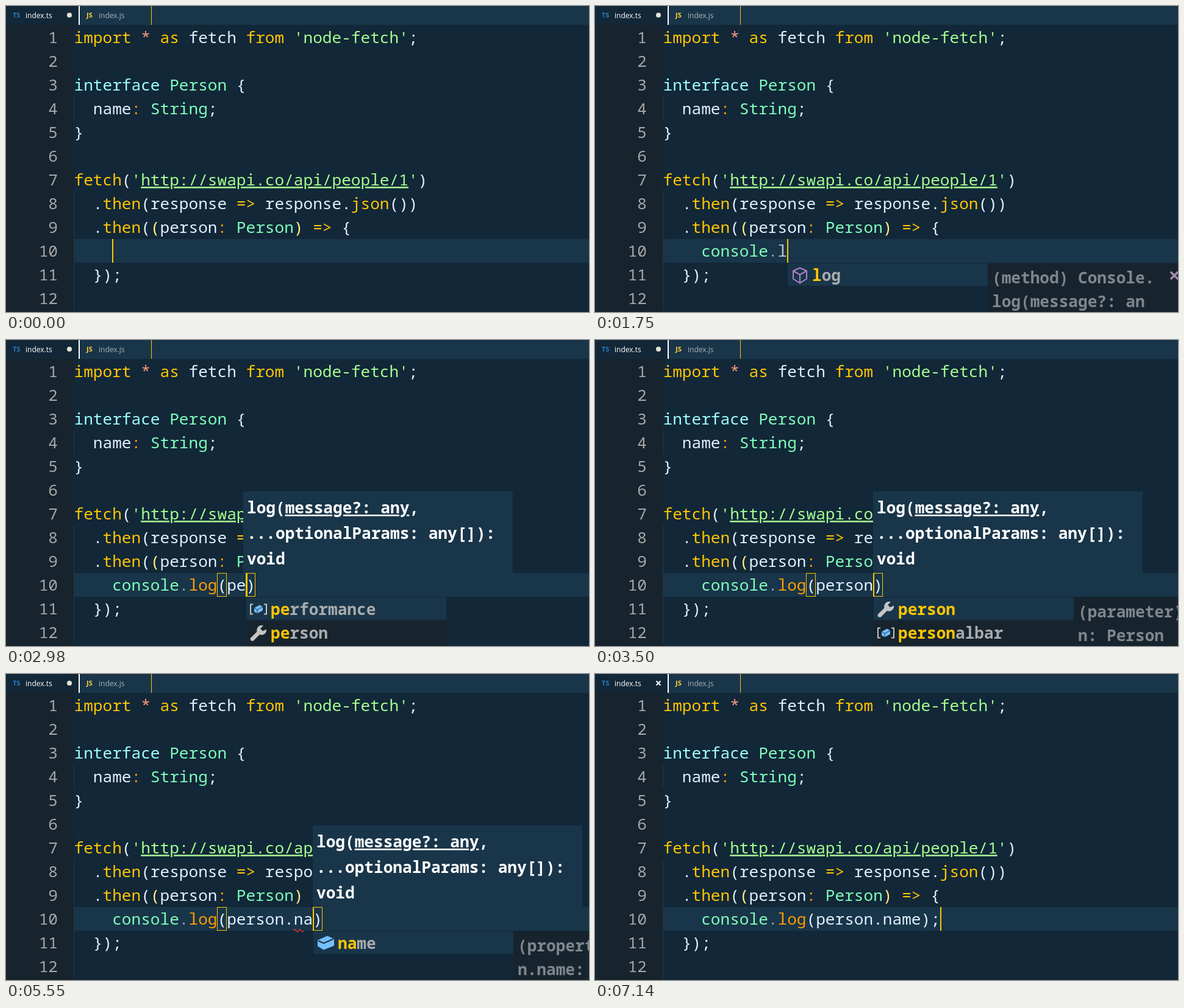
Animation of 956 by 503 pixels, one loop 7.96 s. Source, as an HTML page:

```html
<!DOCTYPE html>
<html lang="en">
<head>
<meta charset="utf-8">
<title>Typing in an editor</title>
<style>
  html, body { margin: 0; width: 100%; height: 100%; overflow: hidden; background: #122738; }
  svg { display: block; width: 100vw; height: 100vh; }
  text { white-space: pre; font: 26.12px "Noto Sans Mono", monospace; font-variant-ligatures: none; }
  .bold { font-weight: 700; }
  .details { font-weight: 600; fill: #80868b; }
  .tab { font: 12px "Open Sans", sans-serif; }
  .kind { font: 700 11px "Open Sans", sans-serif; }
  .link { text-decoration: underline 2px; text-decoration-skip-ink: none; }
</style>
</head>
<body>
<svg viewBox="0 0 956 503">
  <g id="page"></g>
  <g id="live"></g>
</svg>
<script>
const LOOP = 7960, LEFT = 111.5, PITCH = 15.67, LINE = 39;
const COLORS = {
  w: '#e1efff', y: '#ffc600', c: '#9effff', g: '#80ffbb', s: '#a5ff90', u: '#a5ff90',
  o: '#ff9d00', r: '#ff9d80', p: '#ffee80', d: '#8aa0ae', l: '#bcc8d0', m: '#a9abad', k: '#ffffff', K: '#ffffff'
};

const colX = col => LEFT + col * PITCH;
const baseline = line => 61 + (line - 1) * LINE;
const rect = (x, y, w, h, fill, extra = '') =>
  `<rect x="${x}" y="${y}" width="${w}" height="${h}" fill="${fill}" ${extra}/>`;
const path = (d, fill, stroke = 'none', width = 2) =>
  `<path d="${d}" fill="${fill}" stroke="${stroke}" stroke-width="${width}" stroke-linejoin="round"/>`;
const label = (x, y, text, extra) => `<text x="${x}" y="${y}" ${extra}>${text}</text>`;
// Runs are [colour key, text]; keys u and K are underlined.
const runs = (x, y, parts, cls = '') => label(x, y, parts.map(([key, text]) =>
  `<tspan fill="${COLORS[key]}"${/[uK]/.test(key) ? ' class="link"' : ''}>${text}</tspan>`).join(''), `class="${cls}"`);

const CODE = {
  1: [['y', 'import '], ['r', '*'], ['y', ' as '], ['w', 'fetch '], ['y', 'from '], ['s', "'node-fetch'"], ['w', ';']],
  3: [['c', 'interface '], ['g', 'Person '], ['w', '{']],
  4: [['w', '  name'], ['o', ': '], ['g', 'String'], ['w', ';']],
  5: [['w', '}']],
  7: [['y', 'fetch'], ['w', '('], ['s', "'"], ['u', 'http://swapi.co/api/people/1'], ['s', "'"], ['w', ')']],
  8: [['w', '  .'], ['y', 'then'], ['w', '(response '], ['y', '=> '], ['w', 'response.'], ['y', 'json'], ['w', '())']],
  9: [['w', '  .'], ['y', 'then'], ['w', '('], ['p', '('], ['w', 'person'], ['o', ': '], ['g', 'Person'],
      ['p', ') '], ['y', '=> '], ['w', '{']],
  11: [['w', '  });']]
};

const ICONS = {
  method: path('M0-12 11-7V6L0 13-11 6V-7ZM-11-7 0-1 11-7M0-1V13', 'none', '#b180c8', 2),
  variable: path('M-9-8H-13V8H-9M9-8H13V8H9', 'none', '#c5c5c5', 2) +
    path('M-7-2 2-7 7-4V2L-2 7-7 4Z', '#75beff') + path('M-7-2-2 1 7-4M-2 1V7', 'none', '#193549', 1),
  parameter: path('M-10 10 3-3', 'none', '#c5c5c5', 6.5) +
    path('M8-12A8 8 0 1 0 13-6L7-3 3-7Z', '#c5c5c5') + '<circle cx="-10" cy="10" r="3.3" fill="#c5c5c5"/>',
  field: path('M-13-5 3-12 14-7V4L-3 11-13 5Z', '#75beff') + path('M-12-4-3 0 13-7', 'none', '#193549', 2)
};

const LISTS = {
  global: { items: [['variable', 'console'], ['method', 'confirm']] },
  console: { items: [['variable', 'console']] },
  members: { items: [['method', 'assert'], ['method', 'clear']], details: ['(method) Console.', 'assert(test?: boo'] },
  log: { items: [['method', 'log']], details: ['(method) Console.', 'log(message?: an'] },
  early: { items: [['variable', 'performance'], ['parameter', 'person']] },
  perf: { items: [['variable', 'performance'], ['parameter', 'person']], details: ['var performance: ', 'Performance'] },
  person: { items: [['parameter', 'person'], ['variable', 'personalbar']], details: ['(parameter) perso', 'n: Person'] },
  name: { items: [['field', 'name']], details: ['(property) Perso', 'n.name: String'] }
};

// Time, text before the caret, suggestion list, options
const STEPS = [
  [0, ''],
  [250, '', null, { noCaret: true }],
  [810, 'c'],
  [870, 'c', 'global'],
  [930, 'co', 'global'],
  [1030, 'con', 'global'],
  [1120, 'cons', 'console'],
  [1210, 'conso', 'console'],
  [1300, 'consol', 'console'],
  [1380, 'console', 'console'],
  [1490, 'console.'],
  [1550, 'console.', 'members'],
  [1750, 'console.l', 'log'],
  [1980, 'console.lo', 'log'],
  [2110, 'console.log', 'log'],
  [2340, 'console.log('],
  [2440, 'console.log(', null, { sig: true }],
  [2850, 'console.log(p', null, { sig: true }],
  [2890, 'console.log(p', 'early', { sig: true }],
  [2980, 'console.log(pe', 'early', { sig: true, lag: 4 }],
  [3030, 'console.log(per', 'early', { sig: true }],
  [3080, 'console.log(per', 'perf', { sig: true }],
  [3280, 'console.log(pers', 'person', { sig: true }],
  [3380, 'console.log(perso', 'person', { sig: true }],
  [3460, 'console.log(person', 'person', { sig: true }],
  [3650, 'console.log(person.', null, { sig: true }],
  [3700, 'console.log(person.', 'name', { sig: true }],
  [3980, 'console.log(person.n', 'name', { sig: true }],
  [4310, 'console.log(person.n', 'name', { sig: true, wave: 1 }],
  [5550, 'console.log(person.na', 'name', { sig: true, wave: 1 }],
  [5880, 'console.log(person.nam', 'name', { sig: true, wave: 2 }],
  [5970, 'console.log(person.name', 'name', { sig: true, wave: 2 }],
  [6310, 'console.log(person.name)'],
  [6570, 'console.log(person.name);'],
  [7090, 'console.log(person.name);', null, { saved: true }]
];

function drawPage() {
  let out = rect(0, 0, 956, 503, '#122738') + rect(0, 31, 111, 472, '#17242e') +
    rect(119, 0, 837, 31, '#193549') + rect(119, 0, 2, 31, '#fff') + rect(238, 0, 1, 31, '#ffc600') +
    label(11, 19, 'TS', 'class="kind" fill="#2b7cc0"') + label(32, 20, 'index.ts', 'class="tab" fill="#fff"') +
    label(132, 19, 'JS', 'class="kind" fill="#ffd23a"') + label(152, 20, 'index.js', 'class="tab" fill="#a9b3ba"') +
    rect(111, 383, 845, LINE, '#193549');
  for (let n = 1; n <= 12; n++) {
    out += label(85, baseline(n), n, 'text-anchor="end" fill="#a5a7a8"');
    if (n === 4 || n > 7) out += rect(111, 32 + (n - 1) * LINE, 1, LINE, '#20394a');
    if (CODE[n]) out += runs(LEFT, baseline(n), CODE[n]);
  }
  return out;
}

function drawTyped(text) {
  const [, object, dot, method, rest] = text.match(/^(\w*)(\.?)(\w*)(.*)$/);
  const closing = rest && !rest.includes(')') ? ')' : '';
  return runs(colX(4), baseline(10), [
    [object === 'console' ? 'g' : 'w', object], ['d', dot], [rest ? 'o' : 'l', method], ['w', rest + closing]
  ]);
}

function drawBrackets(col) {
  return [15, col].map(c => rect(Math.floor(colX(c)) + .5, 383.5, 15, 38, 'none', 'stroke="#ffc600"')).join('');
}

function drawWave(count) {
  return ['#e5343d', '#d9a52b'].slice(0, count).map((color, i) =>
    path(`M${colX(23 + i)} 422` + 'q2-4 4 0t4 0'.repeat(2), 'none', color, 1.5)).join('');
}

function drawSignature(x) {
  return rect(x, 249, 442, 134, '#193549') +
    runs(x + 6, 285, [['k', 'log('], ['K', 'message?: any'], ['k', ',']], 'bold') +
    runs(x + 6, 327, [['k', '...optionalParams: any[]):']], 'bold') +
    runs(x + 6, 369, [['k', 'void']], 'bold');
}

function drawList(x, { items, details }, typed) {
  const word = typed.match(/\w*$/)[0];
  let out = '';
  items.forEach(([kind, name], i) => {
    const y = 423 + i * LINE;
    out += rect(x, y, 328, i ? 41 : 37, i ? '#17242e' : '#193549') +
      `<g transform="translate(${x + 20} ${y + 19.5})">${ICONS[kind]}</g>` +
      runs(x + 40, y + 29, [['y', name.slice(0, word.length)], ['m', name.slice(word.length)]], 'bold');
  });
  if (details) {
    const cx = x + 634;
    out += rect(x + 328, 423, 330, 80, '#17242e') +
      details.map((line, i) => label(x + 335, 456 + i * LINE, line, 'class="details"')).join('') +
      path(`M${cx - 6} 437l12 12m0-12l-12 12`, 'none', '#a58bb0', 3.5);
  }
  return out;
}

function drawLive([, text, list, { noCaret, sig, lag = 0, wave, saved } = {}]) {
  const col = 4 + text.length, x = colX(col);
  let out = saved
    ? path('M100.5 11.5l7 7m0-7l-7 7', 'none', '#fff', 2)
    : '<circle cx="104" cy="15" r="4" fill="#e6e4d3"/>';
  out += drawTyped(text);
  if (/\([^)]*$/.test(text)) out += drawBrackets(col);
  if (wave) out += drawWave(wave);
  if (sig) out += drawSignature(Math.floor(x) - lag);
  if (list) out += drawList(Math.ceil(x), LISTS[list], text);
  if (!noCaret) out += rect(Math.round(x), 383, 2, LINE, '#ffc600');
  return out;
}

const live = document.getElementById('live');
document.getElementById('page').innerHTML = drawPage();
let shown;
function tick() {
  const time = performance.now() % LOOP;
  const step = STEPS.findLast(([start]) => start <= time);
  if (step !== shown) live.innerHTML = drawLive(shown = step);
  requestAnimationFrame(tick);
}
tick();
</script>
</body>
</html>
```
